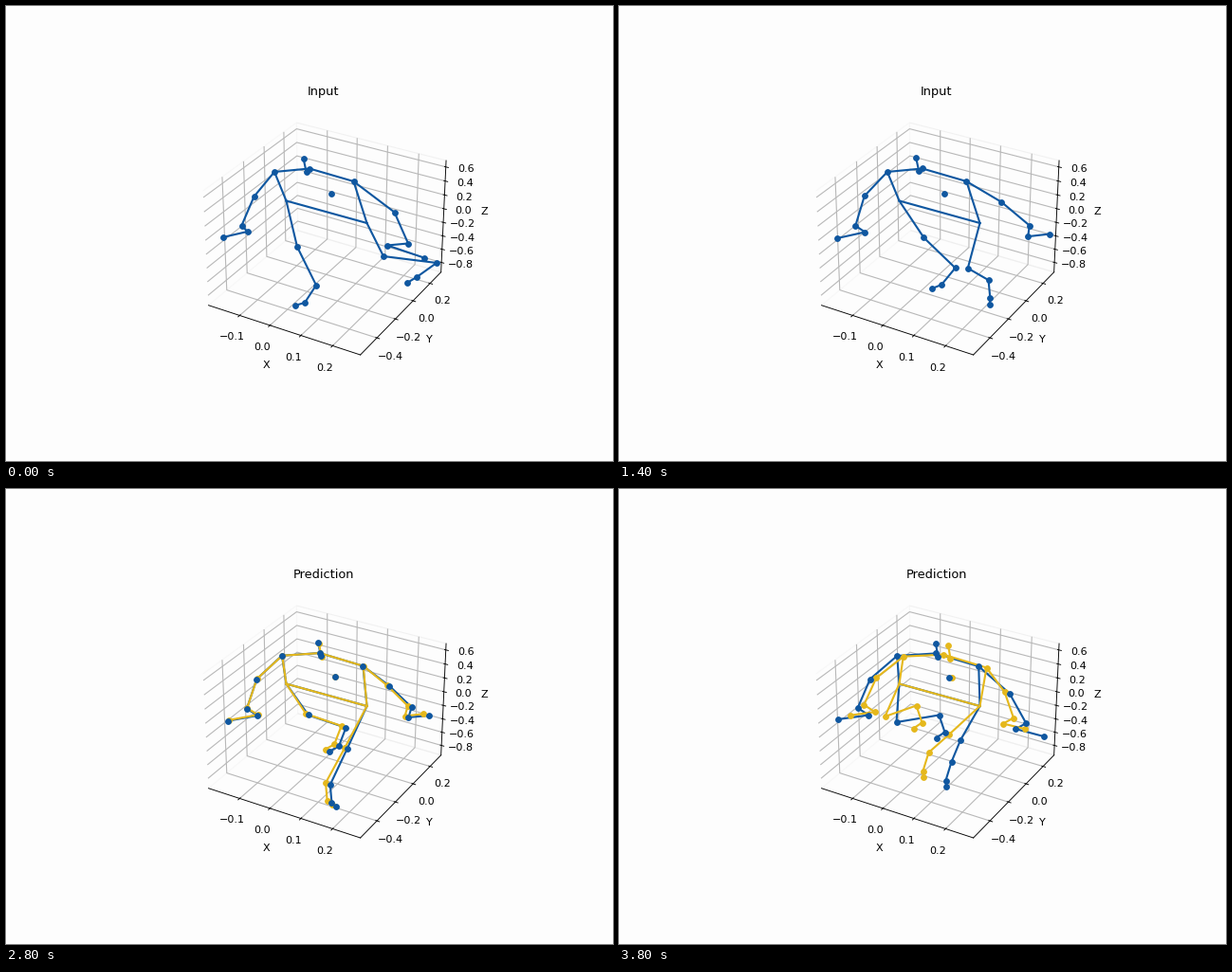
A matplotlib script that plays this animation: 640 px wide and 480 px high, repeating every 4 s.

```python
import numpy as np
import matplotlib.pyplot as plt
from matplotlib.animation import FuncAnimation

W, H, DPI = 640, 480, 80
FRAMES, STEP = 20, 200
FORECAST = 10                     # frame at which the prediction starts
BLUE, GOLD = "#0f57a0", "#e5b81c"
DOT_SIZE, LINE_WIDTH = 26, 1.9

CHAINS = [c.split() for c in (
    "hip_l hip_r",
    "hip_l knee_l ankle_l foot_l toe_l",
    "hip_r knee_r ankle_r foot_r toe_r",
    "hip_l sho_l elb_l wri_l hand_l tip_l",
    "hip_r sho_r elb_r wri_r hand_r tip_r",
    "sho_l neck sho_r",
    "neck head crown",
)]


def glide(*pts):
    """Smooth path through points spread evenly over the loop."""
    p = np.array(pts, float).reshape(len(pts), -1)
    m = np.gradient(p, axis=0)
    u = np.linspace(0, len(p) - 1, FRAMES)
    i = np.minimum(u.astype(int), len(p) - 2)
    t = (u - i)[:, None]
    s = t * t * (3 - 2 * t)
    return (p[i] + s * (p[i + 1] - p[i])
            + t * (1 - t) ** 2 * m[i] - t * t * (1 - t) * m[i + 1])


def walk(err):
    """Joint paths in pixels; err is the growing error of a prediction."""
    body = {}
    sway = glide(0, -0.22, -0.03, 0.05, 0.38, 1, 0.85) + 0.55 * err ** 2

    def torso(name, rest, gain):
        body[name] = np.array(rest) + sway * np.array(gain)

    def bone(name, parent, drift, *pts):
        body[name] = body[parent] + glide(*pts) + err * np.array(drift)

    torso("hip_l", (295.5, 205.5), (0, 0))
    torso("hip_r", (380.5, 229), (0, 0))
    torso("spine", (343, 198), (6, 0.7))
    torso("neck", (320, 171.5), (16, 2.3))
    torso("head", (316.5, 174.5), (23.5, 3))
    torso("crown", (313.5, 160.5), (24, 3))
    torso("sho_l", (283, 175), (12, 1.2))
    torso("sho_r", (366.5, 185), (15, 2.5))

    still, thigh, shin = (0, 0), (-12, -6), (-12, -4)

    bone("elb_l", "sho_l", (0, -2), (-21.5, 26), (-28.5, 24.5))
    bone("wri_l", "elb_l", (0, -2), (-13, 30.5), (-9, 31.5), (-13, 30.5))
    bone("hand_l", "wri_l", still, (6, 6.5), (11, 6.8), (11.5, 7.5))
    bone("tip_l", "hand_l", (7, -1), (-26, 6), (-30.5, 6.5), (-32.5, 4.5))

    bone("elb_r", "sho_r", (-13.5, -3),
         (43, 32.5), (41, 25), (32, 19.5), (28, 21.5), (32.5, 28.5))
    bone("wri_r", "elb_r", (-8, -4),
         (14.5, 33), (30.5, 27), (26, 23), (23, 22.5), (17.5, 31.5))
    bone("hand_r", "wri_r", still,
         (-22, 2), (-6.5, 10.5), (1, 11.5), (-3.5, 10.5), (-11, 6))
    bone("tip_r", "hand_r", (-7.5, -2.5),
         (38.5, 13), (29, 0), (17.5, -3.5), (21.5, -1.5), (30, 8))

    bone("knee_l", "hip_l", thigh,
         (11.5, 48.5), (23.5, 41.5), (26.5, 36.5), (22.5, 33), (-3, 40.5))
    bone("ankle_l", "knee_l", shin,
         (20, 40.5), (32.5, 34), (33, 28.5), (40, 12.5), (45, -7.5))
    bone("foot_l", "ankle_l", still,
         (-12, 18.5), (-14, 18), (-14, 17.5), (-7, 19.5), (6, 18))
    bone("toe_l", "foot_l", still, (-10.5, 3), (-9, 6))

    bone("knee_r", "hip_r", thigh,
         (17.5, 35), (-6, 46.5), (-17.5, 47), (-21, 45), (-20.5, 36))
    bone("ankle_r", "knee_r", shin,
         (56, 7), (64, -4), (30, 7), (-8, 37), (-17, 41), (-16.5, 31), (-9.5, 23))
    bone("foot_r", "ankle_r", still,
         (-21, 15), (0, 19), (1, 19), (1.5, 19.5), (-6, 19.5))
    bone("toe_r", "foot_r", still,
         (-10, 6), (-3.5, 9), (2, 3.5), (5, 4), (0.5, 6))
    return body


late = np.clip((np.arange(FRAMES) - FORECAST) / (FRAMES - 1 - FORECAST), 0, 1)
late = late[:, None]
real, pred = walk(0 * late), walk(late ** 2)
JOINTS = [j for j in real if not j.startswith("hip")]

plt.rcParams.update({"grid.linewidth": 1, "grid.color": "#b8b8b8"})
fig = plt.figure(figsize=(W / DPI, H / DPI), dpi=DPI, facecolor="#fdfdfd")

# Empty 3D box
box = fig.add_axes([192 / W, 94 / H, 285 / W, 285 / H], projection="3d")
box.patch.set_visible(False)
box.set(xlim=(-0.205, 0.286), ylim=(-0.573, 0.333), zlim=(-0.948, 0.69),
        xticks=np.arange(-1, 3) / 10, yticks=np.arange(-2, 2) / 5,
        zticks=np.arange(-4, 4) / 5)
for axis, name in zip((box.xaxis, box.yaxis, box.zaxis), "XYZ"):
    axis.pane.fill = False
    axis.set_major_formatter("{x:.1f}")
    axis.set_label_text(name)
    axis.labelpad = 3
title = box.set_title("Input", fontsize=11.6)

# Skeletons, in pixel coordinates
stage = fig.add_axes([0, 0, 1, 1], zorder=5)
stage.set(xlim=(0, W), ylim=(H, 0))
stage.axis("off")


def make_skeleton(color, z):
    lines = [stage.plot([], [], color=color, lw=LINE_WIDTH, zorder=z)[0]
             for _ in CHAINS]
    dots = stage.scatter(np.zeros(len(JOINTS)), np.zeros(len(JOINTS)),
                         s=DOT_SIZE, c=color, zorder=z + 3)
    return lines, dots


def pose(skeleton, body, i):
    lines, dots = skeleton
    for line, chain in zip(lines, CHAINS):
        line.set_data(*np.array([body[j][i] for j in chain]).T)
    dots.set_offsets([body[j][i] for j in JOINTS])


blue, gold = make_skeleton(BLUE, 2), make_skeleton(GOLD, 3)


def update(i):
    forecast = i >= FORECAST
    title.set_text("Prediction" if forecast else "Input")
    pose(blue, real, i)
    pose(gold, pred, i)
    for artist in [*gold[0], gold[1]]:
        artist.set_visible(forecast)
    # blue dots come to the front once the two poses part
    blue[1].set_zorder(7 if i >= FORECAST + 2 else 5)
    return []


anim = FuncAnimation(fig, update, frames=FRAMES, interval=STEP,
                     init_func=lambda: [], repeat=True, repeat_delay=0)
plt.show()
```
